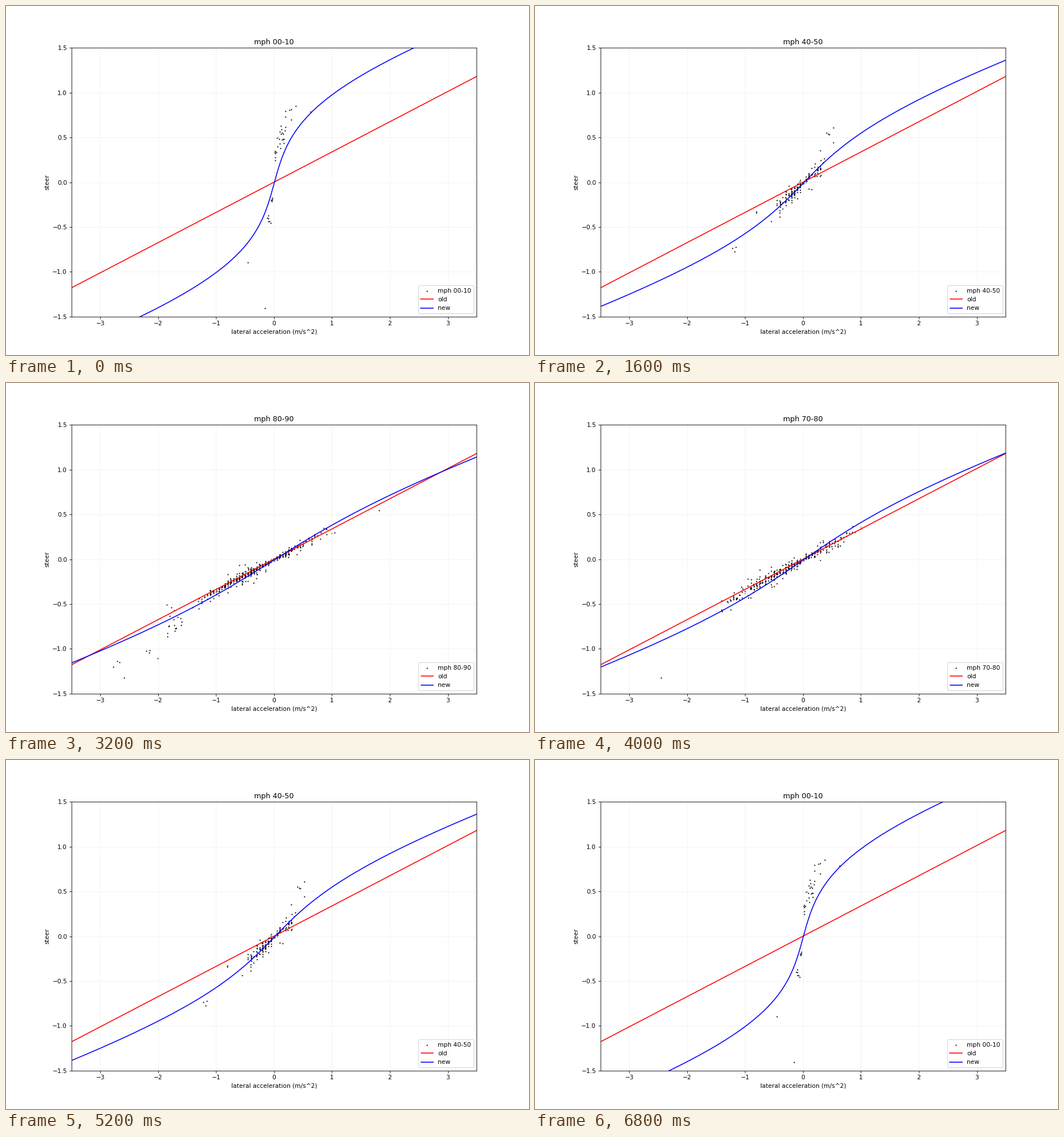
Recreate the animation shown at these times as a matplotlib script. Size 917 by 611 pixels, loop 7.2 s.

```python
import numpy as np
import matplotlib.pyplot as plt
from matplotlib.animation import FuncAnimation

BINS = 9
STEP_MS = 400
DPI = 76.4

# Small groups away from the main cloud: (count, x, y, spread) per speed bin
GROUPS = {
    0: [(6, .27, .77, .06), (5, -.045, -.19, .01), (6, -.10, -.42, .025),
        (1, -.155, -1.403, 0), (1, -.45, -.897, 0), (1, .635, .79, 0)],
    4: [(3, -1.15, -.735, .03), (2, -.795, -.333, .01), (5, .48, .51, .05)],
    6: [(13, 1.75, .86, .09), (5, 1.28, .71, .09), (12, -1.06, -.66, .08),
        (6, -1.65, -.60, .08)],
    7: [(1, -2.45, -1.32, 0)],
    8: [(4, -2.67, -1.21, .06), (4, -2.15, -1.02, .08),
        (18, -1.75, -.70, .09), (1, 1.81, .545, 0)],
}


def old_steer(x):
    return .3372 * x + .001


def new_steer(x, mph):
    gain = 1.604 * (67 / (mph + 22)) ** 1.67
    return .3 * np.arcsinh(gain * x) + .185 * x - .017 + .0001 * mph


def make_cloud(rng, mph):
    """Scatter along a blend of both curves, wider and denser with speed."""
    if mph < 10:
        x = rng.triangular(0, .06, .25, 24)
        return x, .3 + 1.4 * x + rng.normal(0, .08, x.size)
    reach = np.clip(.04 * mph - 1.2, .25, 1.5)
    count = int(max(30, 5.5 * mph - 95))
    x = rng.triangular(-reach, -.3 * reach, .75 * reach, count)
    x = .05 * np.round(x / .05) + rng.normal(0, .004, count)
    blend = np.clip(1.6 - .018 * mph, .2, 1)
    y = old_steer(x) + blend * (new_steer(x, mph) - old_steer(x))
    noise = rng.laplace(0, 2.2 / mph, count)
    return x, y + noise * np.minimum(1, .3 + 2 * np.abs(x))


def make_points(k):
    rng = np.random.default_rng(k)
    parts = [np.column_stack(make_cloud(rng, 10 * k + 5))]
    for count, x, y, spread in GROUPS.get(k, []):
        parts.append(rng.normal((x, y), spread, (count, 2)))
    return np.vstack(parts)


POINTS = [make_points(k) for k in range(BINS)]
xs = np.linspace(-3.5, 3.5, 1001)

# Slightly over the whole pixel, so the canvas truncates to 917 x 611
fig, ax = plt.subplots(figsize=(917.02 / DPI, 611.02 / DPI), dpi=DPI)
dots = ax.scatter([], [], s=1, c="black")
old_line, = ax.plot(xs, old_steer(xs), "r", label="old")
new_line, = ax.plot(xs, new_steer(xs, 5), "b", label="new")
ax.grid(color="0.95")
ax.set(xlim=(-3.5, 3.5), ylim=(-1.5, 1.5),
       xlabel="lateral acceleration (m/s^2)", ylabel="steer")


def draw(i):
    # Speed bins run up, then back down
    k = min(i, 2 * BINS - 1 - i)
    name = f"mph {k}0-{k + 1}0"
    dots.set_offsets(POINTS[k])
    dots.set_label(name)
    new_line.set_ydata(new_steer(xs, 10 * k + 5))
    ax.set_title(name)
    ax.legend(handles=[dots, old_line, new_line], loc="lower right")
    return dots, new_line


anim = FuncAnimation(fig, draw, frames=2 * BINS, interval=STEP_MS,
                     repeat=True, blit=False)
plt.show()
```
